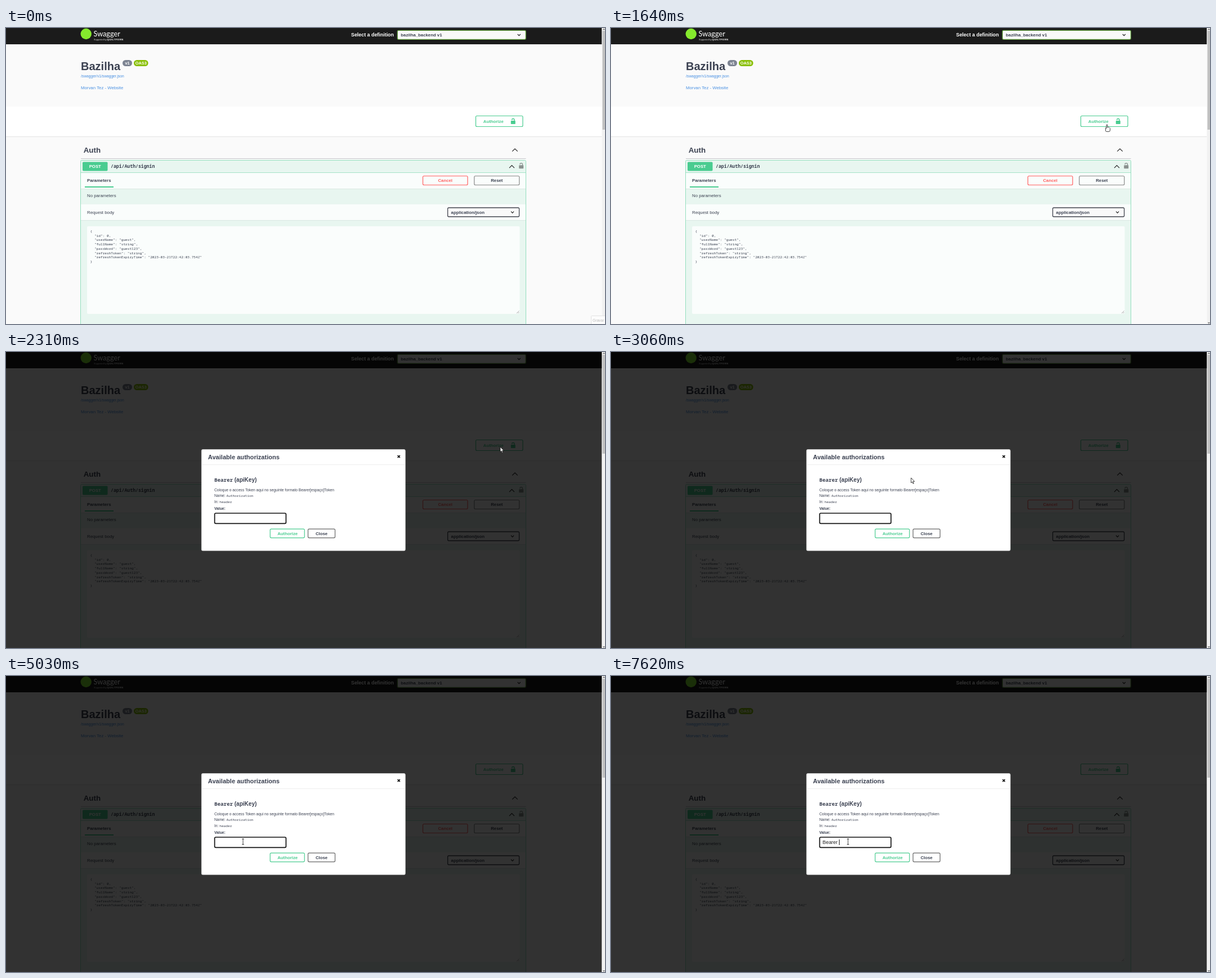
An HTML page with a canvas for the animation above (8000 ms loop, 1064 by 527 pixels).

```html
<!DOCTYPE html>
<html lang="pt">
<head>
<meta charset="utf-8">
<title>API authorization</title>
<style>
html, body { margin: 0; width: 100%; height: 100%; overflow: hidden; background: #fafafa; }
canvas { display: block; }
</style>
</head>
<body>
<canvas id="stage" width="1064" height="527"></canvas>
<script>
const LOOP = 8000;
const STEP = 68;
const PAGE_W = 1058.5, LEFT = 133, RIGHT = 923.5;
const SANS = '"Liberation Sans", Arial, sans-serif';
const MONO = '"Noto Sans Mono", "DejaVu Sans Mono", monospace';
const INK = '#3b4151', GREEN = '#49cc90', RED = '#ff6060', LINK = '#4990e2';
const SMALL = 6.68, BASE = 7.8, CODE = 6.13;
const ctx = document.getElementById('stage').getContext('2d');

const clamp = (v, lo, hi) => Math.min(hi, Math.max(lo, v));
const easeOut = (p, power) => 1 - (1 - p) ** power;

// ---- drawing helpers ----
function rect(x, y, w, h, fill) {
  ctx.fillStyle = fill;
  ctx.fillRect(x, y, w, h);
}

function box(x, y, w, h, r, fill, stroke, line = 1.2) {
  ctx.beginPath();
  ctx.roundRect(x, y, w, h, r);
  if (fill) { ctx.fillStyle = fill; ctx.fill(); }
  if (stroke) outline(stroke, line);
}

function outline(color, line) {
  ctx.strokeStyle = color;
  ctx.lineWidth = line;
  ctx.stroke();
}

// Returns the width of the drawn text.
function text(str, x, y, size, { color = INK, bold = false, font = SANS, align = 'left', gap = 0 } = {}) {
  ctx.font = `${bold ? 'bold ' : ''}${size}px ${font}`;
  ctx.letterSpacing = gap + 'px';
  ctx.textAlign = align;
  ctx.fillStyle = color;
  ctx.fillText(str, x, y);
  return ctx.measureText(str).width;
}

function path(points) {
  ctx.beginPath();
  points.forEach(([x, y]) => ctx.lineTo(x, y));
}

// A negative height points upwards.
function chevron(x, y, w, h, color = '#222') {
  path([[x - w / 2, y - h / 2], [x, y + h / 2], [x + w / 2, y - h / 2]]);
  outline(color, 1.2);
}

function openLock(x, y, color) {
  box(x, y + 4, 8, 6, 0.8, color);
  ctx.beginPath();
  ctx.arc(x + 4, y + 2.8, 2.3, 0, Math.PI, true);
  ctx.moveTo(x + 6.3, y + 2.8);
  ctx.lineTo(x + 6.3, y + 4.5);
  outline(color, 1.3);
}

function button(label, x, y, w, h, color, { border = color, shift = 0 } = {}) {
  box(x, y, w, h, 2, null, border);
  text(label, x + w / 2 + shift, y + h / 2 + 2.9, BASE, { color, bold: true, align: 'center' });
}

function dropdown(label, x, y, w, border) {
  box(x, y, w, 16, 2, '#f9f9f9', border, 1.3);
  text(label, x + 6, y + 10.6, BASE, { bold: true });
  chevron(x + w - 12, y + 8, 5, 2.6);
}

function badge(label, x, y, w, h, r, size, fill) {
  box(x, y, w, h, r, fill);
  text(label, x + w / 2, y + h / 2 + size * 0.36, size, { color: '#fff', bold: true, align: 'center' });
}

// ---- page ----
function topBar() {
  rect(0, 0, PAGE_W, 29, '#1b1b1b');
  box(132.5, 0.8, 19.4, 19.4, 9.7, '#85ea2d');
  text('Swagger', 155.5, 14.8, 12.7, { color: '#fff', font: 'Lato, sans-serif' });
  text('Supported by', 156, 22, 3.8, { color: '#ddd' });
  text('QUILTFERN', 179.5, 22, 4.3, { color: '#fff', bold: true, gap: 0.55 });
  text('Select a definition', 613, 15, 8.9, { color: '#fff', bold: true });
  dropdown('bazilha_backend v1', 695.3, 4.3, 228, '#62a03f');
}

function info() {
  text('Bazilha', LEFT, 75, 20.05, { bold: true });
  badge('v1', 207, 57, 17, 11, 5.5, 7.4, '#7d8492');
  badge('OAS3', 227, 57, 25.6, 11, 5.5, 7.4, '#89bf04');
  text('/swagger/v1/swagger.json', LEFT, 88, SMALL, { color: LINK });
  text('Morvan Tez - Website', LEFT, 109, BASE, { color: LINK });
}

function authBar() {
  rect(0, 140, PAGE_W, 53, '#fff');
  rect(0, 193, PAGE_W, 1, '#e3e3e3');
  button('Authorize', 834.5, 156.5, 83.5, 19, GREEN, { shift: -10.5 });
  openLock(896.8, 161, GREEN);
}

function operation() {
  text('Auth', 137.7, 222.4, 13.37, { bold: true });
  chevron(904, 217.3, 9.5, -4.6);
  rect(LEFT, 232, RIGHT - LEFT, 1, '#c4c6ca');

  box(132.5, 235.5, 791, 320, 2, '#e8f6f0', '#93dfbe', 1);
  rect(LEFT, 257, RIGHT - LEFT - 0.5, 1, '#a4e3c8');
  badge('POST', 136, 238.5, 44.5, 16, 1.7, BASE, GREEN);
  text('/api/Auth/signin', 186, 249.4, 8.17, { bold: true, font: MONO });
  chevron(898.5, 246.8, 9, -4.6);
  openLock(911.2, 240.2, '#8a918f');

  for (const y of [258, 314]) {
    rect(LEFT, y, RIGHT - LEFT - 0.5, 28, '#fafdfc');
    rect(LEFT, y + 28, RIGHT - LEFT - 0.5, 0.8, '#d8e5df');
  }
  text('Parameters', 144, 274.4, BASE, { bold: true });
  rect(140, 282, 51, 2, GREEN);
  button('Cancel', 740.5, 263.5, 79.5, 16, RED);
  button('Reset', 831.8, 263.5, 80, 16, INK, { border: '#888' });
  text('No parameters', 144, 301, BASE);
  text('Request body', 144, 330.6, BASE);
  dropdown('application/json', 784.6, 320, 127, '#41444e');
}

const BODY = JSON.stringify({
  id: 0,
  userName: 'guest',
  fullName: 'string',
  passWord: 'guest123',
  refreshToken: 'string',
  refreshTokenExpiryTime: '2023-03-21T22:42:03.754Z'
}, null, 2).split('\n');

function requestBody() {
  box(144, 353, 768.5, 156, 2, '#fafdfc');
  BODY.forEach((line, i) => text(line, 149.6, 363.9 + i * 7.72, CODE, { font: MONO }));
  for (const d of [2, 4.5]) {
    path([[911.5 - d, 508], [911.5, 508 - d]]);
    outline('#888', 0.7);
  }
}

function scrollBar() {
  rect(PAGE_W, 0, 6, 527, '#f1f1f1');
  rect(1059.5, 5, 4.5, 176, '#c1c1c1');
  chevron(1062, 2.5, 3, -1.5, '#666');
  chevron(1062, 524.8, 3, 1.5, '#666');
}

function tooltip() {
  box(1039.5, 512.5, 30, 20, 1, '#fcfcfc', '#e2e2e2', 1);
  text('Gravar', 1042, 522.6, SMALL, { color: '#bbb' });
}

// ---- dialog ----
function dialog(t) {
  rect(0, 0, PAGE_W, 527, 'rgba(0,0,0,.8)');
  box(347.3, 173.6, 362, 180.2, 2.2, '#fff', '#ebebeb', 0.6);
  text('Available authorizations', 358.8, 190.5, 11.1, { bold: true });
  for (const d of [2.1, -2.1]) {
    path([[697.7 - d, 184], [697.7 + d, 188.2]]);
    outline('#000', 1.6);
  }
  rect(347.6, 200.4, 361.4, 0.7, '#e6e6e6');

  const x = 370;
  const name = text('Bearer', x, 230.5, 9.2, { bold: true, font: MONO });
  text('(apiKey)', x + name + 2.7, 230.5, 10.03, { bold: true });
  text('Coloque o access Token aqui no seguinte formato Bearer[espaço]Token', x, 247.6, SMALL);
  [['Name: ', 'Authorization'], ['In: ', 'header']].forEach(([label, code], i) => {
    const y = 258.4 + i * 10.8;
    text(code, x + text(label, x, y, SMALL), y, CODE, { font: MONO });
  });
  text('Value:', x, 281.2, SMALL, { bold: true });

  box(370.6, 287, 126.8, 18.4, 2.2, '#fff', '#101010', 1.7);
  typing(t);
  button('Authorize', 469.2, 315.2, 61, 15.6, GREEN, { shift: 0.5 });
  button('Close', 536.5, 315.2, 48, 15.6, INK, { border: '#666' });
}

// Three slow keys, three quick ones, then a late space.
function keysTyped(t) {
  const slow = clamp(Math.floor((t - 5630) / 330), 0, 3);
  const quick = clamp(Math.floor((t - 6790) / 100), 0, 3);
  return slow + quick + (t >= 7620);
}

function typing(t) {
  const typed = 'Bearer '.slice(0, keysTyped(t));
  const width = text(typed, 375.8, 299, 8.9, { color: '#222' });
  const caretOn = Math.floor((t - 2380) / 530) % 2 === 0;
  if (typed || caretOn) rect(Math.round(375.8 + width), 291, 1, 10, '#222');
}

// ---- pointer ----
const START = { x: 1066, y: 528 };
const MOVES = [
  { from: 0, to: 470, x: 990, y: 382 },
  { from: 612, to: 1370, x: 885, y: 178, powerY: 2.7 },
  { from: 1430, to: 1904, x: 878, y: 169, powerX: 1.5, powerY: 2 },
  { from: 2448, to: 3060, x: 533, y: 224 },
  { from: 3060, to: 3260, x: 520, y: 219 },
  { from: 3264, to: 4080, x: 444, y: 240 },
  { from: 4080, to: 4570, x: 421, y: 295, powerX: 5, powerY: 5 }
];

function pointerAt(t) {
  const shown = Math.floor((t + 14) / STEP) * STEP;
  return MOVES.reduce((at, { from, to, x, y, powerX = 1, powerY = 1 }) => {
    const p = clamp((shown - from) / (to - from), 0, 1);
    return {
      x: at.x + (x - at.x) * easeOut(p, powerX),
      y: at.y + (y - at.y) * easeOut(p, powerY)
    };
  }, START);
}

function arrow() {
  path([[0, 0], [0, 9], [2, 7.2], [3.5, 10.5], [4.9, 9.9], [3.5, 6.7], [6.1, 6.5]]);
  ctx.closePath();
  ctx.fill();
  ctx.stroke();
}

function hand() {
  box(-2.6, 5, 8, 7.5, 2.2, '#fff', '#111', 0.8);
  box(-1, 0, 1.9, 8, 0.9, '#fff', '#111', 0.8);
  rect(-0.6, 5.5, 5.4, 4, '#fff');
}

function textBeam() {
  path([[0, -5], [0, 5]]);
  for (const y of [-5, 5]) {
    ctx.moveTo(-2, y);
    ctx.lineTo(2, y);
  }
  ctx.stroke();
}

function clickGlow() {
  const glow = ctx.createRadialGradient(0, 1, 3, 0, 1, 8);
  glow.addColorStop(0, 'rgba(255,255,0,.7)');
  glow.addColorStop(1, 'rgba(255,255,0,0)');
  rect(-8, -7, 16, 16, glow);
}

function pointer(t) {
  const { x, y } = pointerAt(t);
  ctx.save();
  ctx.translate(x, y);
  if (t >= 2240 && t < 2310) clickGlow();
  ctx.fillStyle = '#fff';
  ctx.strokeStyle = '#111';
  ctx.lineWidth = 0.8;
  if (t >= 4230) textBeam();
  else if (t >= 1500 && t < 2310) hand();
  else arrow();
  ctx.restore();
}

function render(t) {
  rect(0, 0, 1064, 527, '#fafafa');
  topBar();
  info();
  authBar();
  operation();
  requestBody();
  if (t >= 2310) dialog(t);
  scrollBar();
  if (t < 70) tooltip();
  else pointer(t);
}

function tick(now) {
  render(now % LOOP);
  requestAnimationFrame(tick);
}
requestAnimationFrame(tick);
</script>
</body>
</html>
```
